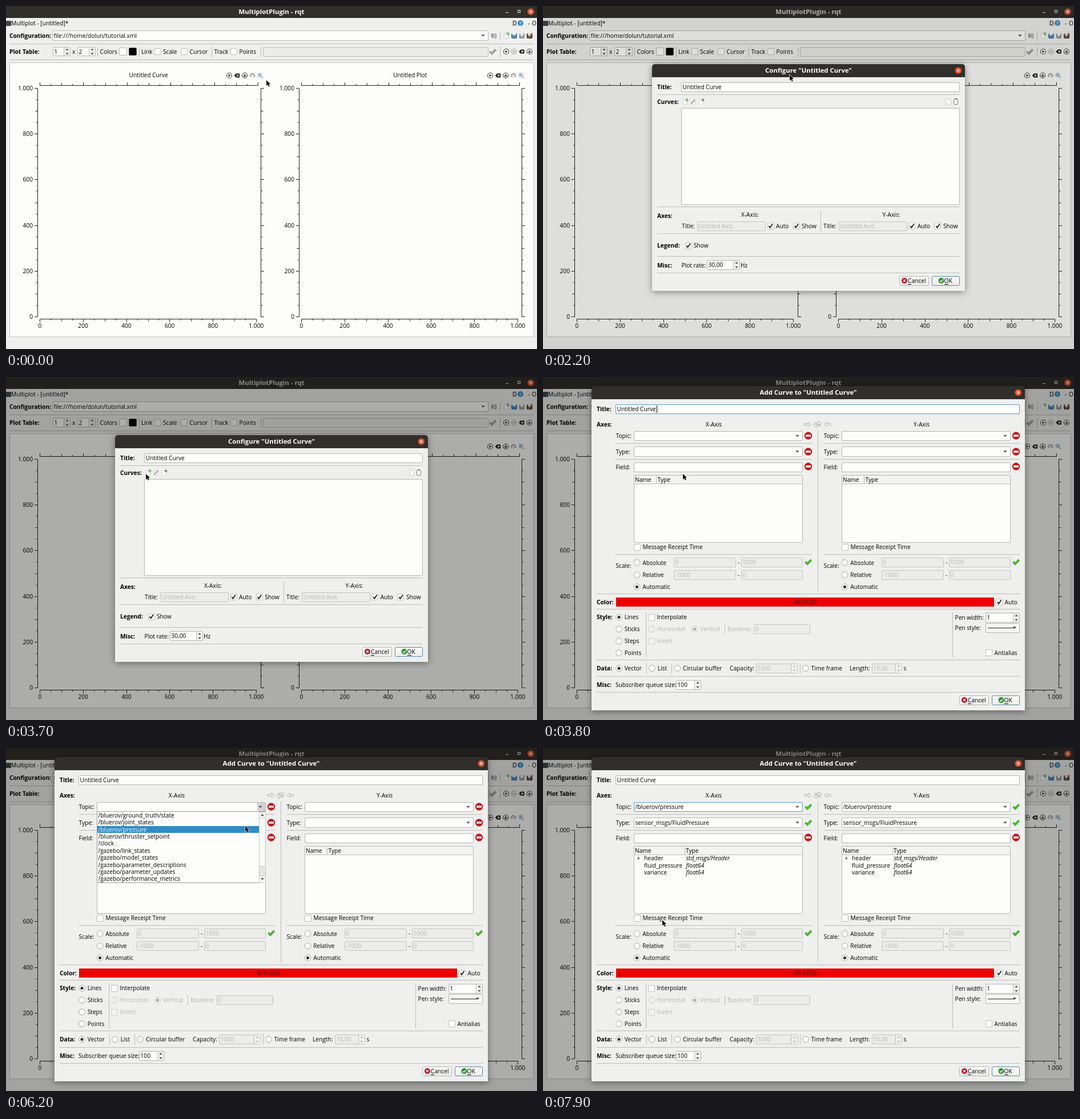
Animation, 930 px wide and 602 px high, one loop 8 s. Source, as an HTML page with a canvas:

```html
<!DOCTYPE html>
<html lang="en">
<head>
<meta charset="utf-8">
<title>Curve configuration</title>
<style>
html, body { margin: 0; width: 100%; height: 100%; overflow: hidden; background: #efefed; }
canvas { display: block; width: 930px; height: 602px; }
</style>
</head>
<body>
<canvas id="stage" width="930" height="602"></canvas>
<script>
const c = document.getElementById('stage').getContext('2d');
const LOOP = 8000, STEP = 100;
const INK = '#000', PALE = '#b6b6b3', EDGE = '#b5b5b2', BLUE = '#5b9cc2';
const BODY = '#efefed', WHITE = '#fdfefb', BAR = '#302f2b';
const FAMILY = '"Open Sans", "Noto Sans", sans-serif';
const PLAIN = `500 10.2px ${FAMILY}`, BOLD = `bold 10.2px ${FAMILY}`;
const ITALIC = `italic 500 10.2px ${FAMILY}`, HEAD = `bold 11.4px ${FAMILY}`;

// Pointer tip: time, x, y
const POINTER = [
  [0, 456, 130], [400, 456, 130], [500, 435, 127], [600, 440, 125], [700, 440, 125],
  [800, 430, 124], [900, 421, 124], [1000, 421, 124], [1100, 426, 123], [1200, 430, 123],
  [1500, 430, 123], [1600, 426, 120], [1700, 433, 122], [1800, 433, 122], [1900, 432, 121],
  [2700, 432, 121], [2900, 392, 130], [3100, 300, 154], [3300, 250, 166], [3500, 250, 166],
  [3700, 245, 170], [4000, 245, 170], [4300, 290, 156], [4600, 400, 121], [4900, 459, 102],
  [5000, 447, 101], [5400, 447, 101], [5600, 444, 103], [5900, 444, 103], [6200, 419, 137],
  [6400, 427, 144], [7000, 427, 144], [7200, 406, 240], [7300, 386, 304], [7400, 386, 304],
  [7600, 320, 326], [7800, 232, 314], [7900, 209, 302], [8000, 209, 302]
];
const DIM = [[2100, 0], [2200, .12], [2400, .2], [2700, .32], [8000, .32]];
const TOPICS = ['bluerov/ground_truth/state', 'bluerov/joint_states', 'bluerov/pressure',
  'bluerov/thruster_setpoint', 'clock', 'gazebo/link_states', 'gazebo/model_states',
  'gazebo/parameter_descriptions', 'gazebo/parameter_updates', 'gazebo/performance_metrics'];

function sample(table, t) {
  const i = table.findIndex(k => k[0] >= t);
  if (i <= 0) return table[0].slice(1);
  const a = table[i - 1], b = table[i], p = (t - a[0]) / (b[0] - a[0]);
  return a.slice(1).map((v, n) => v + (b[n + 1] - v) * p);
}

// Basic drawing; text is placed by its vertical centre
function text(s, x, y, { font = PLAIN, color = INK, align = 'left' } = {}) {
  c.font = font; c.fillStyle = color; c.textAlign = align;
  c.fillText(s, x, Math.round(y + 3.8));
}
const bold = (s, x, y) => text(s, x, y, { font: BOLD });
const mid = (s, x, y) => text(s, x, y, { align: 'center' });
function rect(x0, y0, x1, y1, fill) {
  c.fillStyle = fill; c.fillRect(x0, y0, x1 - x0, y1 - y0);
}
function box(x0, y0, x1, y1, fill = WHITE, edge = EDGE, r = 1.5) {
  c.beginPath(); c.roundRect(x0 + .5, y0 + .5, x1 - x0 - 1, y1 - y0 - 1, r);
  c.fillStyle = fill; c.fill();
  c.strokeStyle = edge; c.lineWidth = 1; c.stroke();
}
function path(points, color, width = 0, close = false) {
  c.beginPath();
  points.forEach(([x, y]) => c.lineTo(x, y));
  if (close) c.closePath();
  if (width) { c.strokeStyle = color; c.lineWidth = width; c.stroke(); }
  else { c.fillStyle = color; c.fill(); }
}
function disc(x, y, r, fill, edge, width = 1) {
  c.beginPath(); c.arc(x, y, r, 0, 7);
  if (fill) { c.fillStyle = fill; c.fill(); }
  if (edge) { c.strokeStyle = edge; c.lineWidth = width; c.stroke(); }
}
const hline = (x0, x1, y) => rect(x0, y, x1, y + 1, '#bcbcb9');
const vline = (x, y0, y1) => rect(x, y0, x + 1, y1, '#bcbcb9');
function cross(x, y, r, color, width) {
  path([[x - r, y - r], [x + r, y + r]], color, width);
  path([[x - r, y + r], [x + r, y - r]], color, width);
}
function triangle(x, y, w, h, color) {
  path([[x - w, y - h / 2], [x + w, y - h / 2], [x, y + h / 2]], color);
}

// Widgets
function field(x0, y0, x1, y1, s = '', { off = false, focus = false } = {}) {
  box(x0, y0, x1, y1, off ? '#ececea' : WHITE, focus ? BLUE : off ? '#c3c3c0' : EDGE);
  text(s, x0 + 2.5, (y0 + y1) / 2, { color: off ? PALE : INK });
}
function combo(x0, y0, x1, y1, s = '', { focus = false, down = false } = {}) {
  field(x0, y0, x1, y1, s, { focus });
  if (down) rect(x1 - 15, y0 + 1, x1 - 1, y1 - 1, '#d3d3d0');
  triangle(x1 - 9.5, (y0 + y1) / 2, 3.2, 3.5, '#555');
}
function spin(x0, y0, x1, y1, s, off = false) {
  field(x0, y0, x1, y1, s, { off });
  const m = (y0 + y1) / 2, color = off ? PALE : '#4a4a48';
  rect(x1 - 12, y0 + 1, x1 - 1, y1 - 1, '#f1f1ef');
  vline(x1 - 12, y0 + 1, y1 - 1);
  triangle(x1 - 6, m - 4, 2.7, -3, color);
  triangle(x1 - 6, m + 4, 2.7, 3, color);
}
function check(x, y, label, { on = false, off = false } = {}) {
  const left = Math.round(x - 6), top = Math.round(y - 6);
  box(left, top, left + 12, top + 12, off ? '#f0f0ee' : WHITE, off ? '#cfcfcc' : '#c0c0bd');
  if (on) path([[x - 3, y], [x - 1, y + 3], [x + 3.5, y - 3.5]], '#111', 1.7);
  text(label, x + 9.5, y, { color: off ? PALE : INK });
}
function radio(x, y, label, { on = false, off = false } = {}) {
  disc(x, y, 5.3, off ? '#f0f0ee' : WHITE, off ? '#c8c8c5' : '#a5a5a2');
  if (on) disc(x, y, 2.6, off ? '#a9a9a7' : '#333');
  text(label, x + 9.7, y, { color: off ? PALE : INK });
}
function buttons(x, y) {
  const face = c.createLinearGradient(0, y - 9, 0, y + 9);
  face.addColorStop(0, '#fcfcfb'); face.addColorStop(1, '#ececea');
  box(x, y - 8.5, x + 52, y + 8.5, face, EDGE, 2);
  box(x + 57, y - 8.5, x + 106, y + 8.5, face, '#5489a6', 2);
  disc(x + 9, y - .5, 5, '#c00d22');
  cross(x + 9, y - .5, 1.9, '#fff', 1.4);
  text('Cancel', x + 15, y);
  rect(x + 15, y + 5.5, x + 21, y + 6.5, INK);
  disc(x + 73.5, y - .5, 5, '#1f9328');
  path([[x + 71, y - .5], [x + 73, y + 1.7], [x + 76.3, y - 2.5]], '#fff', 1.4);
  text('OK', x + 78.5, y);
  rect(x + 79, y + 5.5, x + 86, y + 6.5, INK);
}
function closeButton(x, y) {
  disc(x, y, 5.7, '#e9532b');
  cross(x, y, 2.1, '#fff', 1.2);
}
function dialog(x0, y0, x1, y1, title) {
  c.save();
  c.shadowColor = 'rgba(0,0,0,.42)'; c.shadowBlur = 12; c.shadowOffsetY = 2;
  c.beginPath(); c.roundRect(x0, y0, x1 - x0, y1 - y0, [5, 5, 0, 0]);
  c.fillStyle = BAR; c.fill();
  c.restore();
  rect(x0, y0 + 23, x1, y1, BODY);
  text(title, (x0 + x1) / 2, y0 + 11.5, { font: HEAD, color: '#fff', align: 'center' });
  closeButton(x1 - 11.7, y0 + 11.3);
}

// Icons
function play(x, y) {
  disc(x, y, 4.5, '#fff', '#3a3a3a', 1.1);
  path([[x - 1.5, y - 2.3], [x + 2.6, y], [x - 1.5, y + 2.3]], '#222');
}
function pause(x, y) {
  disc(x, y, 4.5, '#f7f7f5', '#999', 1);
  rect(x - 2, y - 2, x - .8, y + 2, '#888'); rect(x + .8, y - 2, x + 2, y + 2, '#888');
}
function erase(x, y) {
  path([[x - 5, y], [x - 1.5, y - 3.5], [x + 4.5, y - 3.5], [x + 4.5, y + 3.5], [x - 1.5, y + 3.5]], '#151515');
  cross(x + 1, y, 1.5, '#fff', 1.1);
}
function eject(x, y) {
  disc(x, y, 4.5, '#fff', '#3a3a3a', 1.1);
  triangle(x, y - .7, 2.7, -3, '#222');
  rect(x - 2.4, y + 1.4, x + 2.4, y + 2.4, '#222');
}
function gear(x, y) {
  c.beginPath(); c.arc(x, y + .5, 3.7, 2.6, 6.9);
  c.strokeStyle = '#a3a3a0'; c.lineWidth = 2; c.stroke();
  disc(x, y + 1, 2, '#f1f1ee', '#c2c2bf', .8);
}
function zoom(x, y) {
  path([[x + 1.5, y + 1.5], [x + 4.5, y + 4.5]], '#999', 1.6);
  disc(x - 1, y - 1, 3.4, '#e3edf6', '#8ba6c1', 1);
  path([[x - 3, y - 1], [x + 1, y - 1]], '#5c8dbb', 1);
  path([[x - 1, y - 3], [x - 1, y + 1]], '#5c8dbb', 1);
}
function page(x, y, badge, edge = '#bdbdba') {
  box(x - 4, y - 5, x + 4, y + 5, '#fbfbf9', edge, 1);
  if (badge) disc(x + 3, y - 3, 2.4, badge);
}
function plusPage(x, y) {
  page(x, y, '#3fa535', '#cfcfcc');
  rect(x + 1.5, y - 3.4, x + 4.5, y - 2.6, '#fff');
  rect(x + 2.6, y - 4.5, x + 3.4, y - 1.5, '#fff');
}
function tick(x, y, color = '#4fc530', edge = '#369022') {
  const points = [[x - 5, y], [x - 1.5, y + 3.4], [x + 5.3, y - 3.6]];
  path(points, edge, 3.8); path(points, color, 2.4);
}
function stop(x, y) {
  disc(x, y, 6.3, '#cf141d', '#b01018', .8);
  rect(x - 4.5, y - 1.7, x + 4.5, y + 1.7, '#fff');
}
function arrow(x, y, dir) {
  path([[-6, -1.5], [1, -1.5], [1, -4], [6, 0], [1, 4], [1, 1.5], [-6, 1.5]]
    .map(([a, b]) => [x + a * dir, y + b]), '#b3b3b0', 1, true);
}

// Main window
function scale(x0, y0, dx, dy, tx, ty) {
  path([[x0, y0], [x0 + dx, y0 + dy]], '#222', 1);
  for (let i = 0; i <= 20; i++) {
    const len = i % 4 === 0 ? 5.5 : i % 2 === 0 ? 4 : 2.5;
    const x = dx ? Math.round(x0 + dx * i / 20 - .5) + .5 : x0;
    const y = dy ? Math.round(y0 + dy * i / 20 - .5) + .5 : y0;
    path([[x, y], [x + tx * len, y + ty * len]], '#222', 1);
  }
}
function plot(shift, title, right) {
  c.save(); c.translate(shift, 0);
  mid(title, 249.7, 121.5);
  [play, erase, eject, gear, zoom].forEach((icon, i) => icon(right - 55.5 + 13.6 * i, 122));
  scale(55.5, 144.5, 0, 401, -1, 0);
  scale(right, 144.5, 0, 401, 1, 0);
  scale(59.5, 139.5, 382, 0, 0, -1);
  scale(59.5, 549.5, 379, 0, 0, 1);
  for (let i = 0; i <= 5; i++) {
    const label = i < 5 ? String(i * 200) : '1.000';
    text(label, 47, 545.3 - 80.2 * i, { align: 'right' });
    mid(label, 59.3 + 75.8 * i, 561.5);
  }
  c.restore();
}
function mainWindow(active) {
  rect(0, 0, 930, 602, BODY);
  rect(0, 0, 930, 21, BAR);
  text('MultiplotPlugin - rqt', 465, 10, { font: HEAD, color: active ? '#fff' : '#c9c9c5', align: 'center' });
  rect(875, 11, 880, 12, '#e8e8e5');
  c.strokeStyle = '#e8e8e5'; c.lineWidth = 1; c.strokeRect(896.5, 7.5, 4, 4);
  closeButton(919, 10);

  rect(0, 26, 9, 35, '#3f454c');
  text('Multiplot - [untitled]*', 9, 30);
  rect(886, 25, 896, 36, '#e2e2df');
  text('D', 887, 30);
  disc(901, 30, 5, '#348fc9');
  text('?', 901, 30, { font: `bold 8px ${FAMILY}`, color: '#d8ebf7', align: 'center' });
  text('-', 914, 30); text('O', 921, 30);

  bold('Configuration:', 6, 52);
  combo(81, 43, 845, 61, 'file:///home/dolun/tutorial.xml');
  box(850, 48, 854, 56, '#a4aab0', '#858b91'); box(855, 48, 859, 57, '#d0d4d7', '#858b91');
  vline(865, 44, 60);
  plusPage(876, 52);
  box(885, 48, 895, 57, '#4b8dc9', '#3d6f9e'); rect(887, 47, 893, 51, '#eef3f7');
  box(899, 48, 908, 57, '#a5a5a3', '#7e7e7c'); rect(901, 48, 906, 52, '#f0f0ee');
  box(912, 48, 922, 57, '#4d4d4b', '#333'); rect(914, 48, 919, 52, '#ddd');
  path([[915, 56], [922, 47]], '#d3813c', 1.6);
  hline(6, 924, 66);

  bold('Plot Table:', 6, 80);
  spin(82, 72, 113, 88, '1'); text('x', 116, 80); spin(125, 72, 157, 88, '2');
  [160, 233, 360, 446, 865].forEach(x => vline(x, 71, 90));
  text('Colors', 164.5, 80);
  box(198, 73, 212, 87); box(215, 73, 229, 87, '#000', '#555');
  text('Link', 237, 80); check(265.5, 80, 'Scale'); check(312, 80, 'Cursor');
  text('Track', 364.5, 80); check(399, 80, 'Points');
  box(450, 72, 845, 89, '#ebebe8', '#bababa');
  tick(852.5, 80, '#a6a6a3', '#8e8e8b');
  [play, pause, erase, eject].forEach((icon, i) => icon(876 + 13.6 * i, 80));
  hline(6, 924, 94);

  box(6, 99, 925, 581, WHITE, '#c3c3c0', 0);
  plot(0, 'Untitled Curve', 446.5);
  plot(458, 'Untitled Plot', 445.5);
}

function plotDialog() {
  dialog(191, 102, 739, 500, 'Configure "Untitled Curve"');
  bold('Title:', 200, 142); field(242, 134, 730, 151, 'Untitled Curve');
  [155, 352, 399, 439, 468].forEach(y => hline(200, 730, y));
  bold('Curves:', 200, 168);
  plusPage(249, 168);
  page(263, 168, null, '#d4d4d1'); path([[259.5, 171.5], [266, 164.5]], '#8c8c8a', 1.7);
  page(277, 168, '#8f8f8d', '#dededb');
  page(708, 167, null, '#cfcfcc'); page(711, 169, null, '#cfcfcc');
  page(723, 168, null, '#777'); rect(721, 162, 725, 164, '#777');
  box(242, 179, 730, 349);
  bold('Axes:', 200, 368);
  mid('X-Axis:', 362.5, 366.5); mid('Y-Axis:', 610, 366.5);
  [0, 247.7].forEach(dx => {
    const x = Math.round(dx);
    text('Title:', 243 + x, 386);
    field(270 + x, 378, 390 + x, 395, 'Untitled Axis', { off: true });
    check(398.5 + dx, 386, 'Auto', { on: true });
    check(443.7 + dx, 386, 'Show', { on: true });
  });
  vline(486, 359, 396);
  bold('Legend:', 200, 420.5); check(254.5, 420.5, 'Show', { on: true });
  bold('Misc:', 200, 455);
  spin(287, 446, 345, 463, '30,00'); text('Hz', 346, 455);
  text('Plot rate:', 242.5, 455);
  buttons(624, 482.5);
}

function axis(dx, s) {
  c.save(); c.translate(dx, 0);
  const off = { off: true }, known = s.type ? tick : stop;
  text('Topic:', 127.5, 103.5);
  combo(159, 95, 455, 112, s.topic ? '/' + TOPICS[2] : '', { focus: s.focus, down: s.down });
  known(464.5, 103);
  text('Type:', 127.5, 131);
  combo(159, 122, 455, 140, s.type ? 'sensor_msgs/FluidPressure' : '');
  known(464.5, 131);
  text('Field:', 127.5, 158); field(159, 150, 455, 167); stop(464.5, 157);
  [116, 144, 311].forEach(y => hline(127, 471, y));
  box(159, 172, 455, 291);
  rect(160, 173, 454, 187, '#f3f3f1'); hline(160, 454, 187);
  const column = s.type ? 250 : 200.5;
  vline(Math.floor(column) - 2, 174, 187);
  text('Name', 161, 180); text('Type', column, 180);
  if (s.type) {
    path([[166, 191], [169.5, 193.5], [166, 196]], '#555');
    [['header', 'std_msgs/Header'], ['fluid_pressure', 'float64'], ['variance', 'float64']].forEach(([name, type], i) => {
      text(name, 177, 193.5 + 12.4 * i);
      text(type, 250.5, 193.5 + 12.4 * i, { font: ITALIC });
    });
  }
  check(165, 298.5, 'Message Receipt Time');
  text('Scale:', 127.5, 331);
  radio(164.5, 325.7, 'Absolute');
  field(229, 317, 338, 334, '0', off); text('-', 341, 325.5); field(347, 317, 455, 334, '1000', off);
  tick(464.5, 324.5);
  radio(164.5, 347.3, 'Relative');
  field(229, 339, 338, 356, '-1000', off); text('-', 341, 347.5); field(347, 339, 455, 356, '0', off);
  radio(164.5, 368.3, 'Automatic', { on: true });
  c.restore();
}
function curveDialog(t) {
  const off = { off: true }, on = { on: true };
  dialog(85, 16, 844, 585, 'Add Curve to "Untitled Curve"');
  bold('Title:', 94, 56);
  field(127, 48, 835, 65, 'Untitled Curve', { focus: t < 4900 });
  if (t < 4400) rect(199, 50, 200, 63, INK);
  bold('Axes:', 94, 83);
  mid('X-Axis', 299, 83); mid('Y-Axis', 663, 83);
  arrow(464, 83, 1); arrow(498, 83, -1);
  arrow(482, 81, 1); arrow(480, 85, -1);
  vline(481, 94, 376);
  const type = t >= 6800;
  axis(0, { topic: t >= 6700, type, focus: t >= 6700 || t >= 4900 && t < 5400, down: t >= 5400 && t < 6700 });
  axis(364, { topic: type, type });
  if (t >= 6700 && t < 7500) rect(248, 97, 249, 110, INK);

  [380, 407, 496, 525, 553].forEach(y => hline(94, 835, y));
  bold('Color:', 94, 395);
  rect(128, 387, 790, 403, '#ec0000');
  text('#FF0000', 459, 395, { color: '#4a0000', align: 'center' });
  check(799, 395, 'Auto', on);
  bold('Style:', 94, 421.3);
  ['Lines', 'Sticks', 'Steps', 'Points'].forEach((s, i) => radio(133, 421.5 + 20.9 * i, s, { on: !i }));
  vline(180, 413, 492); vline(717, 413, 492);
  check(190, 421.5, 'Interpolate');
  radio(190, 442.5, 'Horizontal', off); radio(265.5, 442.5, 'Vertical', { on: true, off: true });
  vline(318, 434, 451);
  text('Baseline:', 323, 442.5, { color: PALE }); field(369, 434, 468, 451, '0', off);
  check(190, 463.5, 'Invert', off);
  text('Pen width:', 721.5, 422.5); spin(775, 414, 835, 431, '1');
  text('Pen style:', 721.5, 440); box(775, 432, 835, 449, '#f7f7f5');
  rect(779, 440, 826, 441, '#222'); triangle(826, 440, 3, 3.5, '#444');
  check(781, 484, 'Antialias');

  bold('Data:', 94, 511.5);
  radio(133, 511.3, 'Vector', on); radio(191, 511.3, 'List'); radio(235.3, 511.3, 'Circular buffer');
  [181, 225, 450].forEach(x => vline(x, 502, 521));
  text('Capacity:', 327, 511.5); spin(373, 503, 446, 520, '1000', true);
  radio(460, 511.3, 'Time frame');
  text('Length:', 537, 511.5); spin(576, 503, 629, 520, '10,00', true); text('s', 631.5, 511.5);
  bold('Misc:', 94, 540);
  spin(233, 532, 277, 549, '100');
  text('Subscriber queue size:', 127, 540);
  buttons(729, 567.5);
}
function popup(y) {
  box(159, 111, 455, 237, WHITE, '#9b9b98', 0);
  const hot = y > 111 ? Math.floor((y - 111.7) / 12.4) : -1;
  TOPICS.forEach((s, i) => {
    const row = 118 + 12.4 * i;
    if (i === hot) rect(160, Math.round(row - 6.2), 443, Math.round(row + 6.2), '#308cc6');
    text('/' + s, 161.5, row, { color: i === hot ? '#eef6fb' : INK });
  });
  box(443, 112, 455, 123, '#f6f6f4', '#c6c6c3', 0);
  box(443, 122, 455, 208, '#f9f9f7', '#c6c6c3', 0);
  box(443, 207, 455, 225, '#e4e4e1', '#c6c6c3', 0);
  box(443, 224, 455, 237, '#f6f6f4', '#c6c6c3', 0);
  triangle(449, 117.5, 3, -3.5, '#555'); triangle(449, 230, 3, 3.5, '#555');
}
function pointer(x, y) {
  const shape = [[0, 0], [0, 10], [2.3, 8], [4, 11.6], [5.8, 10.8], [4.2, 7.3], [7.2, 7.1]]
    .map(([a, b]) => [x + a, y + b]);
  path(shape, 'rgba(255,255,255,.8)', 1.4, true);
  path(shape, '#111');
}

function draw(t) {
  const [x, y] = sample(POINTER, t), [dim] = sample(DIM, t);
  mainWindow(t < 2200);
  rect(0, 0, 930, 602, `rgba(0,0,0,${dim})`);
  if (t >= 3800) curveDialog(t);
  else if (t >= 2200) plotDialog();
  if (t >= 5500 && t < 6700) popup(y);
  pointer(x, y);
}

const start = performance.now();
let shown = -1;
function play8s() {
  const step = Math.floor((performance.now() - start) % LOOP / STEP);
  if (step !== shown) draw((shown = step) * STEP);
  requestAnimationFrame(play8s);
}
play8s();
</script>
</body>
</html>
```
